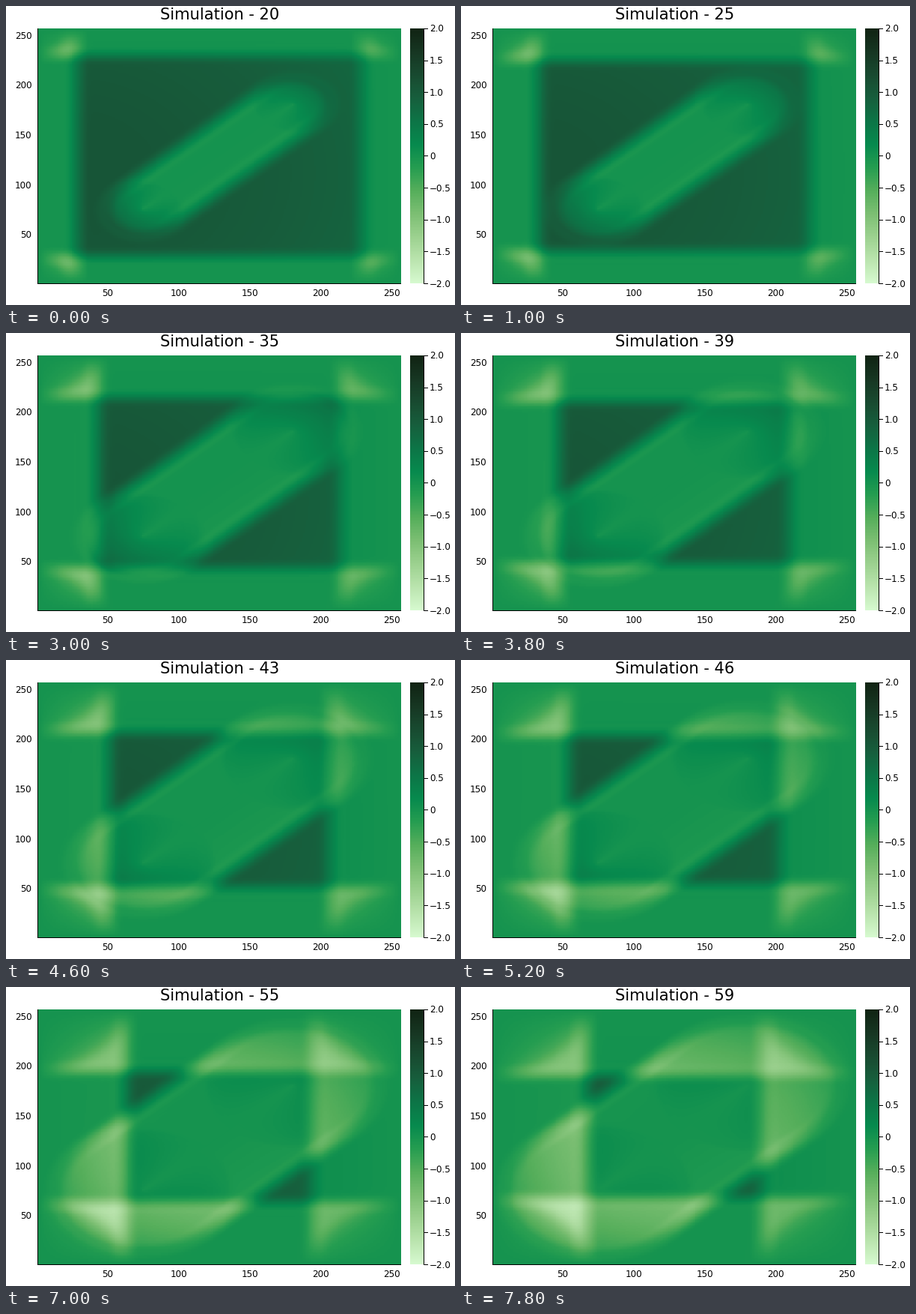
Recreate the animation shown at these times as a matplotlib script. Size 600 by 400 pixels, loop 8 s.

```python
import numpy as np
import matplotlib.pyplot as plt
from matplotlib.animation import FuncAnimation
from matplotlib.colors import LinearSegmentedColormap

W, H, DPI = 600, 400, 100
N = 256                    # grid cells per side
FIRST, COUNT = 20, 40      # first counter value, frames per loop
LEAD = 7.5                 # waves start this long before counter zero
DT = 0.5
RAMP = 10.0                # width of the soft edge beside walls and slit
A, B = 74, 179             # slit runs along the diagonal from A to B
L, T, R, BOT = 42, 30, 528, 371      # plot area in pixels
BAR_L, BAR_R = 540, 558

plt.rcParams["font.family"] = "DejaVu Sans"
ALGAE = [(214, 249, 207), (186, 228, 174), (156, 209, 143), (124, 191, 115),
         (85, 174, 91), (37, 157, 81), (7, 138, 78), (13, 117, 71),
         (23, 95, 61), (25, 75, 49), (23, 55, 35), (17, 36, 20)]
cmap = LinearSegmentedColormap.from_list("algae", np.array(ALGAE) / 255, N=256)


def soft(d):
    return np.sin(np.pi / 2 * np.clip(d / RAMP, 0, 1))


def start_field():
    y, x = np.mgrid[0:N, 0:N].astype(float)
    wall = soft(np.minimum(x, N - 1 - x)) * soft(np.minimum(y, N - 1 - y))
    along = np.clip((x + y) / 2, A, B)
    slit = soft(np.hypot(x - along, y - along))
    level = 1.1 * np.exp(-((x - 20) ** 2 + (y - 110) ** 2) / (2 * 287 ** 2))
    return level * wall * slit


def laplacian(u):
    out = np.zeros_like(u)
    out[1:-1, 1:-1] = (u[2:, 1:-1] + u[:-2, 1:-1] + u[1:-1, 2:]
                       + u[1:-1, :-2] - 4 * u[1:-1, 1:-1])
    return out


def simulate():
    """Wave equation with fixed edges and a fixed diagonal slit."""
    diag = np.arange(A, B + 1)
    u = start_field()
    old = u + 0.5 * DT ** 2 * laplacian(u)
    old[diag, diag] = 0
    per = int(1 / DT)
    first = int((FIRST + LEAD) / DT)
    shots = []
    for step in range(1, first + (COUNT - 1) * per + 1):
        new = 2 * u - old + DT ** 2 * laplacian(u)
        new[diag, diag] = -0.05 * np.exp(-((step * DT - 10) / 3) ** 2)
        old, u = u, new
        if step >= first and (step - first) % per == 0:
            shots.append(u.copy())
    return shots


def nearest(count, size):
    """Grid index shown by each of `size` pixels."""
    return ((np.arange(size) + 0.5) * count / size).astype(int)


fields = simulate()
rows, cols = nearest(N, BOT - T), nearest(N, R - L)

fig = plt.figure(figsize=(W / DPI, H / DPI), dpi=DPI, facecolor="white")


def picture(data, left):
    return fig.figimage(data, left, H - BOT, cmap=cmap, vmin=-2, vmax=2,
                        origin="lower")


heat = picture(fields[0][np.ix_(rows, cols)], L)
ramp = np.linspace(-2, 2, BOT - T)[:, None]
picture(np.repeat(ramp, BAR_R - BAR_L, axis=1), BAR_L)

stage = fig.add_axes([0, 0, 1, 1], zorder=1)
stage.axis("off")
stage.set_xlim(0, W)
stage.set_ylim(H, 0)


def line(x0, y0, x1, y1):
    stage.plot([x0, x1], [y0, y1], color="black", lw=72 / DPI,
               solid_capstyle="butt", snap=False)


def label(x, y, text, px=12, ha="center"):
    return stage.text(x, y, text, fontsize=px * 72 / DPI, ha=ha,
                      va="baseline", color="black")


line(L, BOT + 0.5, R, BOT + 0.5)
line(L + 0.5, T, L + 0.5, BOT)
for v in range(50, 251, 50):
    f = (v - 0.5) / N
    label(L + f * (R - L), 387.5, str(v))
    label(34.5, BOT - f * (BOT - T) + 5.2, str(v), ha="right")

line(BAR_R + 0.5, T, BAR_R + 0.5, BOT + 1)
for k in range(-4, 5):
    y = (T + BOT) / 2 - k * (BOT - T) / 8
    line(BAR_R, round(y) + 0.5, 564, round(y) + 0.5)
    text = f"{k / 2:.1f}".replace("-", "\u2212") if k else "0"
    label(566, y + 4.5, text, ha="left")

title = label(285.5, 18.5, "", px=21)


def draw(i):
    heat.set_data(fields[i][np.ix_(rows, cols)])
    title.set_text(f"Simulation - {FIRST + i}")
    return heat, title


anim = FuncAnimation(fig, draw, frames=COUNT, interval=200,
                     repeat=True, repeat_delay=0, blit=False)
plt.show()
```
